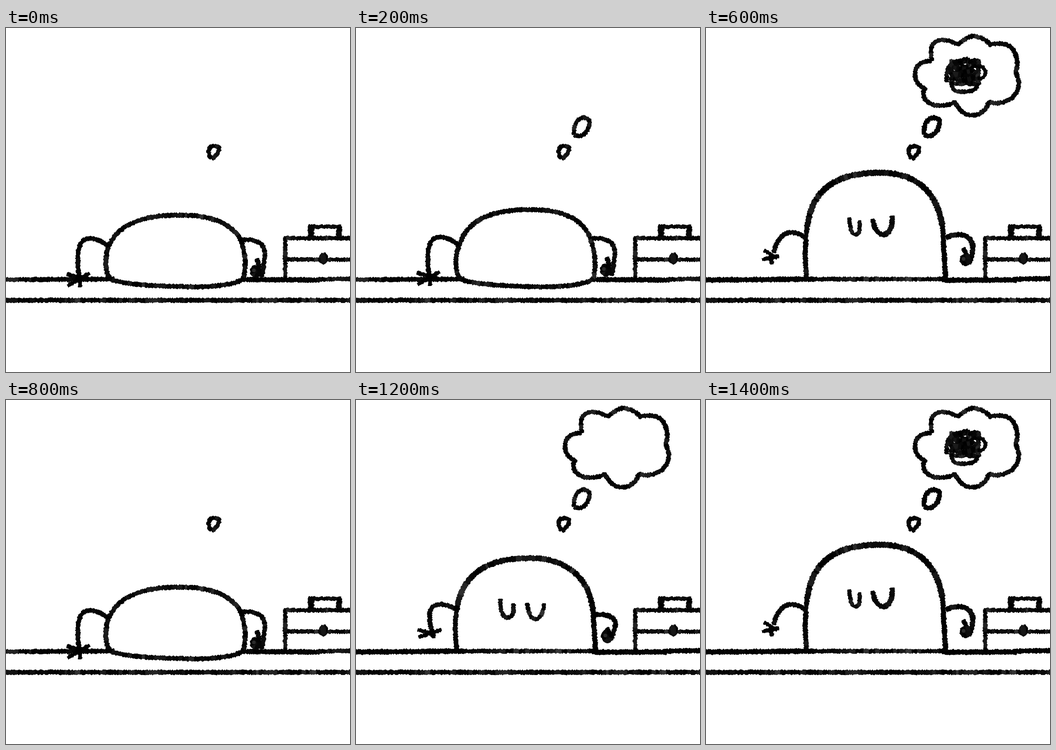
These frames come from a looping animation (748 by 748 pixels, 1.6 s). An HTML page:

```html
<!DOCTYPE html>
<html lang="en">
<head>
<meta charset="utf-8">
<title>Thinking at the desk</title>
<style>
  html, body { margin: 0; width: 100%; height: 100%; overflow: hidden; background: #fff; }
  svg { display: block; width: 100%; height: 100%; }
</style>
</head>
<body>
<svg id="stage" viewBox="0 0 748 748"></svg>
<script>
const NS = 'http://www.w3.org/2000/svg';
const stage = document.getElementById('stage');
const STEP_MS = 200;

let seed = 7;
function rand() {
  seed = (seed * 16807) % 2147483647;
  return seed / 2147483647;
}

function add(parent, tag, attrs) {
  const el = document.createElementNS(NS, tag);
  for (const key in attrs) el.setAttribute(key, attrs[key]);
  if (parent) parent.appendChild(el);
  return el;
}

const pt = p => p[0].toFixed(1) + ' ' + p[1].toFixed(1);

// A rough charcoal stroke: bristly edges and uneven grey along the path.
function brush(parent, d, width, grey = 58) {
  const path = add(null, 'path', { d });
  const length = path.getTotalLength();
  const count = Math.max(3, Math.round(length / 1.7));
  const left = [], right = [];
  for (let i = 0; i <= count; i++) {
    const at = length * i / count;
    const p = path.getPointAtLength(at);
    const a = path.getPointAtLength(Math.max(0, at - 1.5));
    const b = path.getPointAtLength(Math.min(length, at + 1.5));
    const size = Math.hypot(b.x - a.x, b.y - a.y) || 1;
    const nx = (a.y - b.y) / size, ny = (b.x - a.x) / size;
    const cap = Math.min(i, count - i) === 0 ? 0.75 : 1;
    const l = (width / 2 + (rand() - 0.5) * 2.8) * cap;
    const r = (width / 2 + (rand() - 0.5) * 2.8) * cap;
    left.push([p.x + nx * l, p.y + ny * l]);
    right.push([p.x - nx * r, p.y - ny * r]);
  }
  const band = (from, to) => 'M' + left.slice(from, to + 1)
    .concat(right.slice(from, to + 1).reverse()).map(pt).join('L') + 'Z';
  add(parent, 'path', { d: band(0, count), fill: '#0b0b0b' });
  for (let i = 0; i < count;) {
    const end = Math.min(count, i + 3 + Math.floor(rand() * 6));
    const g = Math.round(rand() * rand() * grey);
    add(parent, 'path', { d: band(i, end), fill: `rgb(${g},${g},${g})` });
    i = end;
  }
}

const parts = {};
const BLACK = 12;

function part(name, ...strokes) {
  const g = parts[name] = add(stage, 'g', {});
  for (const stroke of strokes) brush(g, ...stroke);
  return g;
}

function ring(cx, cy, rx, ry) {
  return `M${cx} ${cy - ry}A${rx} ${ry} 0 1 1 ${cx} ${cy + ry}A${rx} ${ry} 0 1 1 ${cx} ${cy - ry}`;
}

function fist(g, cx, cy, ry) {
  add(g, 'ellipse', { cx, cy, rx: 8, ry: ry - 3, fill: '#0c0c0c' });
  brush(g, ring(cx, cy, 8, ry - 5), 9, 40);
  add(g, 'ellipse', { cx: cx - 4, cy: cy - 2, rx: 4, ry: 4, fill: '#2b2b2b' });
}

// Desk
part('deskEdge', ['M-5 592H753', 10]);
part('deskOpen',
  ['M-5 547H62', 9],
  ['M55 547L236 546', 10, BLACK],
  ['M513 547L682 548', 10.5, BLACK],
  ['M675 547L753 545', 9]);
part('deskFull',
  ['M-5 548L236 546', 11, BLACK],
  ['M232 546H517', 9],
  ['M513 548L676 548', 11, BLACK],
  ['M670 546L753 545', 10.5, BLACK]);

// Briefcase
const bag = part('bag',
  ['M607 545V455', 9],
  ['M604 457H753', 9],
  ['M611 503L753 504', 8.5],
  ['M657 432H729', 8.5],
  ['M663.5 428V457', 13, 30],
  ['M724.5 431V457', 12, 30],
  [ring(690, 501, 5, 9), 9, 36]);
add(bag, 'ellipse', { cx: 690, cy: 501, rx: 6, ry: 10, fill: '#171717' });

// Slumped body, with the head raised by a given amount
const slump = lift => `M230 547C214 536 214 498 224 474C240 ${432 - lift} 290 ${407 - lift} 375 ${407 - lift}` +
  `C455 ${406 - lift} 499 ${430 - lift} 513 468C521 495 521 515 518 536C518 546 512 549 500 553` +
  'C460 565 400 563 372 562C330 561 255 558 230 547';
part('bodyLow', [slump(0), 10]);
part('bodyLift', [slump(12), 10]);
part('bodyMid',
  ['M219 546C216 520 214 480 219 455', 10.5, 30],
  ['M219 457C230 380 283 344 375 344C460 342 508 390 515 457', 12],
  ['M515 453L521 547', 11, BLACK]);
part('bodyHigh',
  ['M219 546C215 510 215 470 220 430', 10.5, 30],
  ['M220 432C231 350 283 315 375 315C460 313 503 360 514 430', 12.5],
  ['M514 427L521 547', 11, BLACK]);

// Arms
const armsLow = part('armsLow',
  ['M223 476C205 458 163 440 157 488C155 510 157 528 161 545', 10, 25],
  ['M132 535L176 547', 8.5, BLACK],
  ['M182 533L134 561', 8.5, BLACK],
  ['M161 537L161 564', 9, BLACK],
  ['M513 461C540 457 566 468 563 495C561 512 559 525 556 542', 9.5, 30],
  ['M545 501L553 522', 9.5, BLACK]);
fist(armsLow, 543, 529, 15);
const armsMid = part('armsMid',
  ['M219 457C200 442 160 435 160 468C160 485 164 500 168 516', 10, 25],
  ['M134 499L167 508', 8, BLACK],
  ['M136 516L186 499', 8, BLACK],
  ['M168 503L169 518', 9, BLACK],
  ['M518 468C545 463 566 473 564 488C562 505 556 515 553 522', 10.5, BLACK],
  ['M545 495L557 513', 9, BLACK]);
fist(armsMid, 546, 514, 15);
const armsHigh = part('armsHigh',
  ['M218 457C185 435 160 440 147 489', 10, 30],
  ['M126 483L155 501', 8, BLACK],
  ['M159 496L122 504', 8, BLACK],
  ['M140 490L144 514', 9, BLACK],
  ['M521 456C560 440 581 455 580 480C580 495 575 505 570 512', 11, 35],
  ['M559 478L571 501', 9.5, BLACK]);
fist(armsHigh, 564, 504, 14);

// Closed eyes
part('eyesMid',
  ['M314 432C314 460 318 472 330 473C342 472 344 460 342 442', 9],
  ['M372 441C374 462 380 476 391 476C402 475 408 460 409 442', 9]);
part('eyesHigh',
  ['M311 412C313 435 316 449 325 449C334 448 336 435 334 418', 8.5],
  ['M362 415C366 436 374 449 385 449C400 448 406 430 405 408', 11]);

// Thought bubbles
const drop = 'M447 284C438 272 438 258 452 257C464 256 466 264 460 272C456 278 452 283 447 284';
const oval = 'M474 232C472 212 480 196 495 195C512 196 510 210 503 222C495 235 485 238 474 232';
part('dropGrey', [drop, 9]);
part('dropBlack', [drop, 9.5, BLACK]);
part('ovalGrey', [oval, 9.5]);
part('ovalBlack', [oval, 10.5, BLACK]);
part('cloud', ['M491 72C486 40 492 28 512 26C525 26 537 30 547 36C565 22 575 15 590 19' +
  'C602 22 612 28 617 36C650 30 665 38 672 55C678 70 678 82 673 95C682 112 682 130 674 142' +
  'C664 158 640 168 615 161C608 182 592 190 578 190C558 188 548 175 541 161' +
  'C522 172 490 172 477 156C471 148 472 140 476 131C458 125 453 108 455 95C458 80 470 70 491 72', 9.5]);

let tangle = '';
for (let i = 0; i <= 160; i++) {
  const a = i / 160 * Math.PI * 2;
  tangle += (i ? 'L' : 'M') + pt([563 + 31 * Math.sin(5 * a), 97 + 25 * Math.cos(4 * a + 0.4)]);
}
part('scribble',
  [tangle, 8],
  ['M524 118C521 95 526 76 550 72', 9],
  ['M534 116C536 134 538 138 552 138C580 140 594 134 593 108', 9],
  ['M590 84C612 80 616 112 590 110', 8],
  ['M550 76C562 60 578 66 568 80C580 66 596 66 594 84', 8],
  ['M538 86L582 92L540 100L584 108L548 116', 10, 34]);

// One pose per step; bagLift raises the briefcase slightly.
const poses = [
  { show: 'deskOpen bodyLow armsLow dropGrey' },
  { show: 'deskOpen bodyLift armsLow dropGrey ovalGrey', armLift: 3 },
  { show: 'deskFull bodyMid armsMid eyesMid dropBlack ovalBlack cloud', bagLift: 2 },
  { show: 'deskFull bodyHigh armsHigh eyesHigh dropBlack ovalBlack cloud scribble' },
  { show: 'deskOpen bodyLow armsLow dropGrey' },
  { show: 'deskOpen bodyLift armsLow dropGrey ovalGrey', armLift: 3 },
  { show: 'deskFull bodyMid armsMid eyesMid dropBlack ovalGrey cloud' },
  { show: 'deskFull bodyHigh armsHigh eyesHigh dropBlack ovalBlack cloud scribble' }
];

let current = -1;
function draw(time) {
  const step = Math.floor(time / STEP_MS) % poses.length;
  if (step === current) return;
  current = step;
  const pose = poses[step];
  const shown = new Set(('deskEdge bag ' + pose.show).split(' '));
  for (const name in parts) parts[name].style.display = shown.has(name) ? '' : 'none';
  bag.setAttribute('transform', `translate(0 ${-(pose.bagLift || 0)})`);
  armsLow.setAttribute('transform', `translate(0 ${-(pose.armLift || 0)})`);
}

const start = performance.now();
function tick() {
  draw(performance.now() - start);
  requestAnimationFrame(tick);
}
tick();
</script>
</body>
</html>
```
